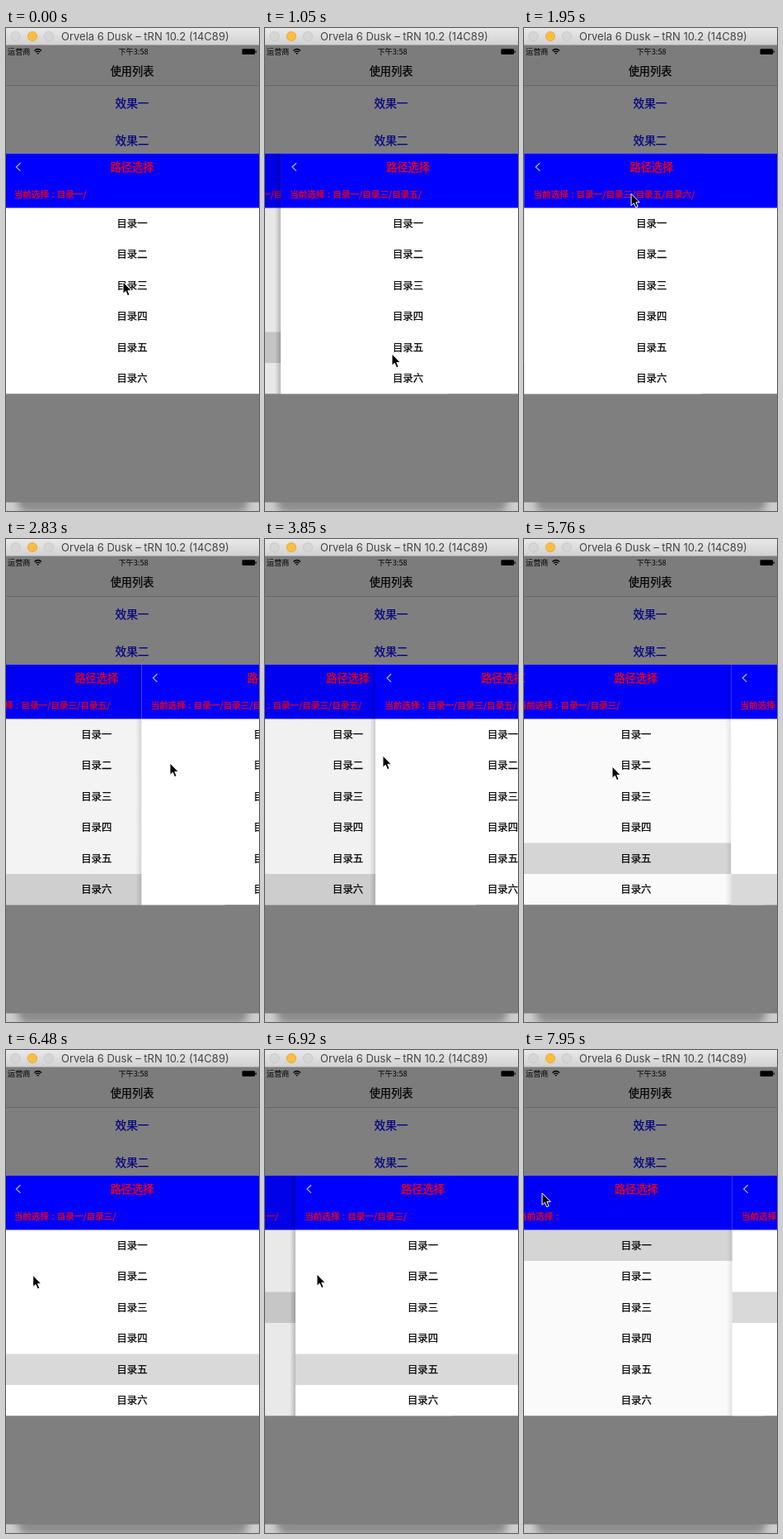
Write an HTML page that moves like this. It is 307 px wide and 584 px high and loops after 8 s.

```html
<!DOCTYPE html>
<html lang="zh-CN">
<head>
<meta charset="utf-8">
<title>路径选择</title>
<style>
  html, body { margin: 0; width: 100%; height: 100%; overflow: hidden; background: #7f7f7f; }
  svg { display: block; width: 100%; height: 100%; }
  text { font-family: "Noto Sans CJK SC", "Noto Sans CJK", sans-serif; font-weight: 500; stroke-width: .25; }
  .mid { text-anchor: middle; }
  .bar { font-family: Inter, "Open Sans", sans-serif; font-weight: 400; }
</style>
</head>
<body>
<svg viewBox="0 0 307 584" preserveAspectRatio="none">
  <defs>
    <linearGradient id="chrome" x2="0" y2="1">
      <stop offset="0" stop-color="#e9e9e9"/><stop offset="1" stop-color="#d1d1d1"/>
    </linearGradient>
    <linearGradient id="edge">
      <stop offset="0" stop-opacity="0"/><stop offset="1" stop-opacity=".22"/>
    </linearGradient>
    <filter id="soft" x="-20%" y="-50%" width="140%" height="200%"><feGaussianBlur stdDeviation="5"/></filter>
    <clipPath id="sheet"><rect y="151.5" width="307" height="291"/></clipPath>
  </defs>

  <rect y="570" width="307" height="14" fill="#cdcdcd"/>
  <rect x="14" y="540" width="280" height="46" rx="12" fill="#8c8c8c" filter="url(#soft)"/>
  <path d="M0 20H307V573.5H0Z" fill="#7f7f7f"/>
  <rect y="20" width="307" height="49" fill="#7c7c7c"/>
  <rect y="69" width="307" height="1" fill="#666"/>

  <rect width="307" height="20.5" fill="url(#chrome)"/>
  <rect y="20" width="307" height=".8" fill="#aaa"/>
  <g stroke-width=".8">
    <circle cx="11.5" cy="10" r="5.6" fill="#d6d6d6" stroke="#c2c2c2"/>
    <circle cx="32" cy="10" r="5.6" fill="#fdbd3e" stroke="#e0a135"/>
    <circle cx="52" cy="10" r="5.6" fill="#d6d6d6" stroke="#c2c2c2"/>
  </g>
  <text class="bar" x="67" y="15" font-size="13" fill="#444">Orvela 6 Dusk – tRN 10.2 (14C89)</text>

  <text x="2" y="32" font-size="9.2">运营商</text>
  <g fill="none" stroke="#000" stroke-width="1.3">
    <path d="M34.4 27.4Q38.7 23.6 43 27.4M36 29.3Q38.7 27 41.4 29.3"/>
    <path d="M38.7 32L37.3 30.5Q38.7 29.5 40.1 30.5Z" fill="#000" stroke="none"/>
  </g>
  <text class="mid" x="154.5" y="32" font-size="9.2">下午3:58</text>
  <rect x="286.5" y="25.3" width="15.6" height="6.8" rx="1.3"/>
  <rect x="302.6" y="27.3" width="1.2" height="2.8" rx=".5"/>

  <text class="mid" x="153" y="57" font-size="13.2" stroke="#000">使用列表</text>
  <g class="mid" fill="#000080" stroke="#000080" font-size="13.7">
    <text x="153" y="96">效果一</text>
    <text x="153" y="140.8">效果二</text>
  </g>

  <g clip-path="url(#sheet)"><g id="stack" transform="translate(-1.5 151.5)"></g></g>

  <path id="arrow" d="M0 0V14.3L3.3 11.3L5.6 16.7L8.1 15.6L5.8 10.4H10.2Z" fill="#000" stroke="#fff" stroke-width="1" stroke-linejoin="round"/>
</svg>
<script>
const W = 310, H = 291, ROW = 37.5, HEAD = 66, LOOP = 8000;
const nums = [...'一二三四五六'];
const picks = [0, 2, 4, 5];              // row chosen on each level
const pressed = [-1, 80, 830, 1580];     // when it was chosen

// Transitions: top level, start; drags also have grip x, release time and outcome
const moves = [
  { kind: 'push', top: 2, at: 80 },
  { kind: 'push', top: 3, at: 830 },
  { kind: 'push', top: 4, at: 1580 },
  { kind: 'drag', top: 4, at: 2420, grip: 33, end: 3300, pop: false },
  { kind: 'drag', top: 4, at: 3480, grip: 7.5, end: 4500, pop: true },
  { kind: 'drag', top: 3, at: 5230, grip: 8, end: 5616, pop: true },
  { kind: 'drag', top: 2, at: 6780, grip: 24.5, end: 7150, pop: true },
  { kind: 'pop', top: 1, at: 7782 }
];

// Pointer stops: time, x, y
const stops = [
  [0, 142, 307], [150, 142, 307], [600, 154, 394], [1050, 154, 394],
  [1350, 154, 420], [1650, 154, 420], [1950, 130, 200], [2240, 80, 11],
  [2420, 33, 270], [2820, 199, 271], [3100, 230, 271], [3300, 60, 268],
  [3480, 7.5, 264], [3843, 143, 262], [4300, 235, 264], [4500, 240, 266],
  [5100, 8, 275], [5230, 8, 276], [5616, 107, 275], [5760, 107, 275],
  [6650, 24.5, 272], [6780, 24.5, 272], [6915, 63, 271], [7150, 190, 265],
  [7330, 60, 147], [7480, 40, 147], [7700, 22, 173], [8000, 22, 173]
];

function el(parent, tag, attrs, text) {
  const node = document.createElementNS('http://www.w3.org/2000/svg', tag);
  for (const k in attrs) node.setAttribute(k, attrs[k]);
  if (text) node.textContent = text;
  return parent.appendChild(node);
}

const stack = document.getElementById('stack');
const arrow = document.getElementById('arrow');

function makePanel(level) {
  const g = el(stack, 'g', {});
  const shade = el(g, 'rect', { x: -7, width: 7, height: H, fill: 'url(#edge)' });
  el(g, 'rect', { width: W, height: H, fill: '#fff' });
  const mark = el(g, 'rect', { y: HEAD + picks[level] * ROW || 0, width: W, height: ROW, fill: '#d9d9d9' });
  el(g, 'rect', { width: W, height: HEAD, fill: '#00f' });
  if (level) el(g, 'path', { d: 'M19 11.8L14 16.6L19 21.4', fill: 'none', stroke: '#b4b4c4', 'stroke-width': 1.3 });
  const red = { fill: '#f00', stroke: '#f00' };
  el(g, 'text', { ...red, class: 'mid', x: 154.5, y: 21.2, 'font-size': 13.2 }, '路径选择');
  const path = picks.slice(0, level).map(i => '目录' + nums[i] + '/').join('');
  el(g, 'text', { ...red, x: 11.2, y: 53.5, 'font-size': 10.6, style: 'word-spacing:1px' }, '当前选择 : ' + path);
  nums.forEach((n, i) => el(g, 'text', {
    class: 'mid', x: 154.5, y: HEAD + i * ROW + 23.4, 'font-size': 12.4, stroke: '#000'
  }, '目录' + n));
  const dim = el(g, 'rect', { width: W, height: H });
  return { g, shade, mark, dim };
}
const panels = [0, 1, 2, 3, 4].map(makePanel);

// Critically damped spring: 1 at rest start, falling to 0
function spring(ms) {
  const u = Math.max(0, ms) / 50;
  return (1 + u) * Math.exp(-u);
}

function pointer(t) {
  const i = Math.max(1, stops.findIndex(s => s[0] > t));
  const [a, x0, y0] = stops[i - 1], [b, x1, y1] = stops[i];
  const u = (t - a) / (b - a), e = u * u * (3 - 2 * u);
  return [x0 + (x1 - x0) * e, y0 + (y1 - y0) * e];
}

function slide(m, t) {
  if (m.kind === 'push') return W * spring(t - m.at);
  if (m.kind === 'pop') return W * (1 - spring(t - m.at));
  const d = Math.max(0, pointer(Math.min(t, m.end))[0] - m.grip);
  if (t < m.end) return d;
  const goal = m.pop ? W : 0;
  return goal + (d - goal) * spring(t - m.end);
}

function tick(t) {
  return t < 1650 ? Math.floor(t / 150) * 150 : 1650 + Math.floor((t - 1650) / 146.25) * 146.25;
}

function place(p, x, dim, shade) {
  p.g.setAttribute('display', 'inline');
  p.g.setAttribute('transform', `translate(${x.toFixed(2)} 0)`);
  p.dim.setAttribute('fill-opacity', dim);
  p.shade.setAttribute('opacity', shade);
}

function draw(time) {
  const t = tick(time % LOOP);
  const m = moves.filter(v => v.at <= t).pop();
  const top = m ? m.top : 1;
  let d = m ? slide(m, t) : 0;
  if (d < .3) d = 0;
  const cover = 1 - d / W;

  panels.forEach((p, i) => {
    p.g.setAttribute('display', 'none');
    p.mark.setAttribute('display', i < 4 && t >= pressed[i] ? 'inline' : 'none');
  });
  if (d > 0) place(panels[top - 1], -.3 * W * cover, .1 * cover, 0);
  if (d < W - .3) place(panels[top], d, 0, d > 0 ? .3 + .7 * cover : 0);

  const [x, y] = pointer(t);
  arrow.setAttribute('transform', `translate(${x.toFixed(2)} ${y.toFixed(2)})`);
}

const begin = performance.now();
function loop(now) {
  draw(Math.max(0, now - begin));
  requestAnimationFrame(loop);
}
draw(0);
requestAnimationFrame(loop);
</script>
</body>
</html>
```
